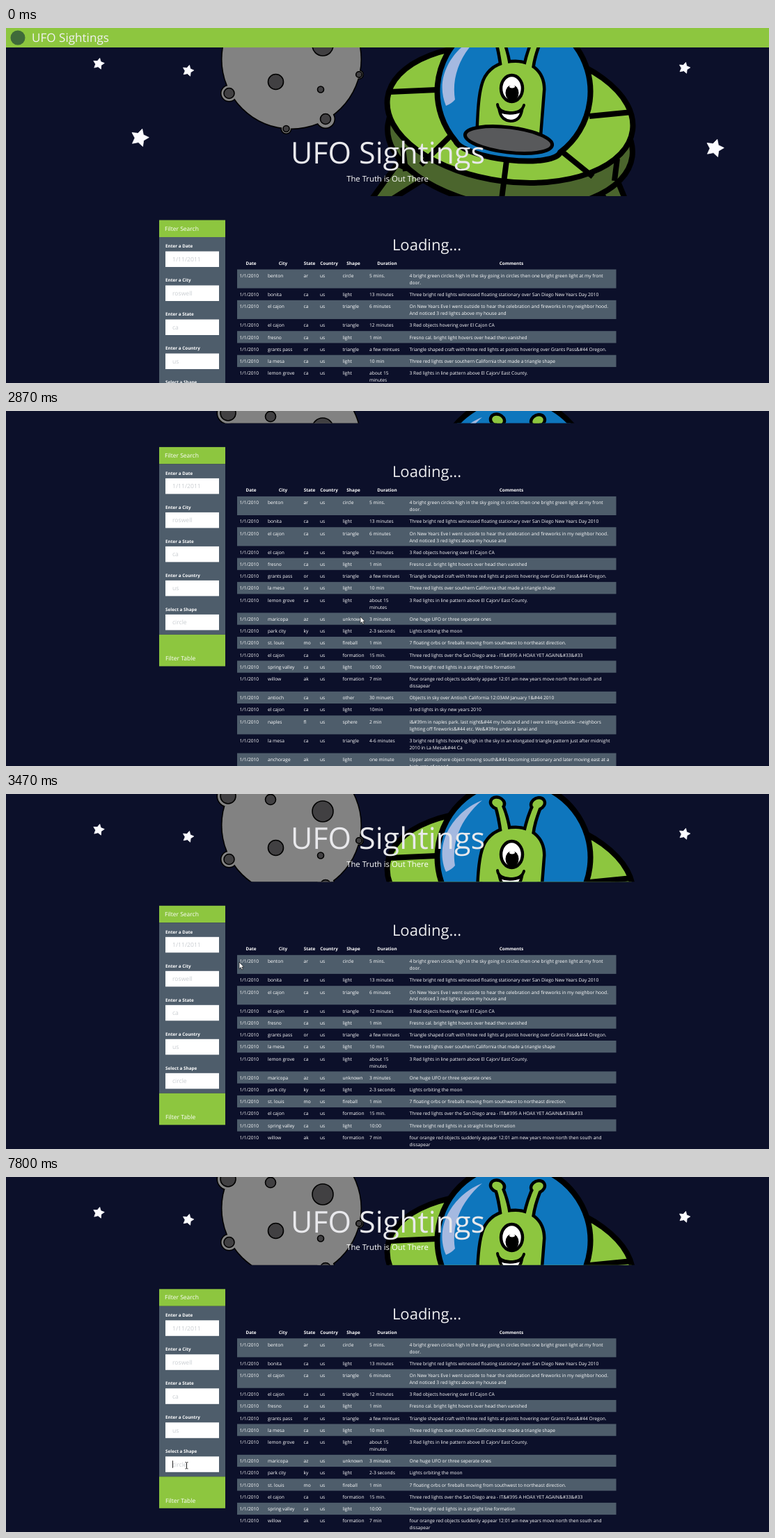
Write an HTML page that moves like this. It is 1096 by 511 pixels and loops after 8000 ms.

```html
<!DOCTYPE html>
<html lang="en">
<head>
<meta charset="utf-8">
<title>UFO Sightings</title>
<style>
  html, body { margin: 0; width: 100%; height: 100%; overflow: hidden; background: #0c102a; }
  svg { display: block; width: 1096px; height: 511px; }
  text { font-family: "Open Sans", "Noto Sans", sans-serif; text-rendering: geometricPrecision; white-space: pre; }
</style>
</head>
<body>
<svg id="stage" viewBox="0 0 1096 511" xmlns="http://www.w3.org/2000/svg"></svg>
<script>
const LOOP = 8000;
const NIGHT = '#0c102a', GREEN = '#8dc63f', OLIVE = '#4b652d', SLATE = '#4e5d6b', BLUE = '#0e76bd';
const stage = document.getElementById('stage');

// --- markup helpers ---
const escapeText = s => s.replace(/&/g, '&amp;').replace(/</g, '&lt;');
const text = (x, y, size, str, attrs = '') =>
  `<text x="${x}" y="${y}" font-size="${size}" fill="#fff" ${attrs}>${escapeText(str)}</text>`;
const rect = (x, y, w, h, fill, attrs = '') =>
  `<rect x="${x}" y="${y}" width="${w}" height="${h}" fill="${fill}" ${attrs}/>`;
const circle = (x, y, r) => `<circle cx="${x}" cy="${y}" r="${r}"/>`;
const path = (d, attrs = '') => `<path d="${d}" ${attrs}/>`;
const MIDDLE = 'text-anchor="middle"';

// Outlines a union of shapes: every stroke first, then every fill.
const outlined = (shapes, fill, width) =>
  `<g fill="#000" stroke="#000" stroke-width="${width}">${shapes}</g><g fill="${fill}">${shapes}</g>`;

// --- backdrop, which stays put while the page scrolls ---
function star(x, y, r, turn) {
  const points = Array.from({ length: 10 }, (_, i) => {
    const a = (turn - 90 + i * 36) * Math.PI / 180, d = i % 2 ? r * 0.52 : r;
    return `${(x + d * Math.cos(a)).toFixed(1)},${(y + d * Math.sin(a)).toFixed(1)}`;
  });
  return `<polygon points="${points.join(' ')}" fill="#fbfbff" stroke="#fbfbff" stroke-width=".8" stroke-linejoin="round"/>`;
}

function moon() {
  const bumps = [[319, 3, 15, 11], [320.5, 94, 11, 7.5], [402.5, 145, 6.5, 4.5], [459, 131, 12.5, 7.5], [507, 67, 5.5, 4.3]];
  const craters = [[387.5, 77.5, 11], [380, 8, 7.5], [455, 25, 15], [452, 88.5, 4.5]];
  const body = circle(410, 45, 99.5) + bumps.map(([x, y, r]) => circle(x, y, r)).join('');
  const pits = craters.concat(bumps.map(([x, y, , r]) => [x, y, r]));
  return outlined(body, '#828282', 3) +
    `<g fill="#414042" stroke="#000" stroke-width="1.6">${pits.map(p => circle(...p)).join('')}</g>`;
}

function saucer() {
  const disc = (y, rx, ry, fill) =>
    `<ellipse cx="724" cy="${y}" rx="${rx}" ry="${ry}" fill="${fill}" transform="rotate(7.5 724 ${y})"/>`;
  const legs = path('M562 196L524 248H552L606 214Z M838 216L862 248H890L872 204Z', `fill="${OLIVE}"`);
  const ribs = path('M551 92L618 89M596 197L649 145M720 183L712 246M795 175L843 214M838 127L899 121M570 172L574 206M878 188L874 220', 'fill="none"');
  const dome = path('M646 163A110 110 0 1 1 796 179A76 21 7 0 1 646 163Z', `fill="${BLUE}"`);
  return `<g stroke="#000" stroke-width="8" stroke-linejoin="round">` +
    legs + disc(162, 177, 96, OLIVE) + disc(124, 177.5, 97, GREEN) + ribs + dome + '</g>' +
    path('M684 9C648 23 613 66 632 112Q640 109 645 103C640 72 651 37 684 9Z', 'fill="#a5b9e0"');
}

function alien() {
  const knobs = '<ellipse cx="706" cy="13" rx="8" ry="6" transform="rotate(20 706 13)"/>' +
    '<ellipse cx="764" cy="14" rx="8" ry="6" transform="rotate(-25 764 14)"/>';
  const stalks = 'M704 14C709 28 711 42 713 56L722 56C720 40 716 26 710 13Z M760 14C753 28 749 42 746 56L755 58C757 42 762 28 767 16Z';
  const body = path('M678 165C680 135 679 90 690 71C699 56 714 50 732 50C752 50 771 63 771 88L765 165Z');
  return outlined(knobs + path(stalks) + body, GREEN, 9) +
    '<ellipse cx="722" cy="161" rx="63" ry="18" fill="#58595b" stroke="#000" stroke-width="5" transform="rotate(7 722 161)"/>' +
    '<ellipse cx="726.5" cy="87" rx="15.5" ry="19" fill="#fff" stroke="#000" stroke-width="4.5"/>' +
    '<ellipse cx="727" cy="93.5" rx="9.5" ry="11.5"/><ellipse cx="727" cy="84" rx="4" ry="2.5" fill="#fff"/>' +
    path('M709 120Q725 126 741 119Q738 134 725 134Q712 133 709 120Z', 'fill="#fff" stroke="#000" stroke-width="4"') +
    path('M706 110Q707 121 724 122Q741 122 744 111', 'fill="none" stroke="#000" stroke-width="4" stroke-linecap="round"');
}

const backdrop = () =>
  star(133, 51.5, 8.3, 12) + star(261.5, 61.5, 8.3, 14) + star(974.5, 57.5, 8.3, 14) +
  star(192, 158, 13.3, 16) + star(1018, 173, 13.3, 16) + moon() + saucer() + alien();

// --- page content ---
const FIELDS = [['Enter a Date', '1/11/2011'], ['Enter a City', 'roswell'], ['Enter a State', 'ca'], ['Enter a Country', 'us'], ['Select a Shape', 'circle']];
const FIELD_TOP = 321.5, FIELD_PITCH = 49, FIELD_HEIGHT = 22.5;
const HEADERS = [[352, 'Date'], [398, 'City'], [436, 'State'], [464, 'Country'], [499, 'Shape'], [547.5, 'Duration'], [726, 'Comments']];
const COLUMNS = [335.5, 376, 427.5, 451, 483.5, 522, 579.5];

// city; state; shape; duration; comments, where | breaks a line
const SIGHTINGS = `benton;ar;circle;5 mins.;4 bright green circles high in the sky going in circles then one bright green light at my front|door.
bonita;ca;light;13 minutes;Three bright red lights witnessed floating stationary over San Diego New Years Day 2010
el cajon;ca;triangle;6 minutes;On New Years Eve I went outside to hear the celebration and fireworks in my neighbor hood.|And noticed 3 red lights above my house and
el cajon;ca;triangle;12 minutes;3 Red objects hovering over El Cajon CA
fresno;ca;light;1 min;Fresno cal. bright light hovers over head then vanished
grants pass;or;triangle;a few mintues;Triangle shaped craft with three red lights at points hovering over Grants Pass&#44 Oregon.
la mesa;ca;light;10 min;Three red lights over southern California that made a triangle shape
lemon grove;ca;light;about 15|minutes;3 Red lights in line pattern above El Cajon/ East County.
maricopa;az;unknown;3 minutes;One huge UFO or three seperate ones
park city;ky;light;2-3 seconds;Lights orbiting the moon
st. louis;mo;fireball;1 min;7 floating orbs or fireballs moving from southwest to northeast direction.
el cajon;ca;formation;15 min.;Three red lights over the San Diego area - IT&#395 A HOAX YET AGAIN&#33&#33
spring valley;ca;light;10:00;Three bright red lights in a straight line formation
willow;ak;formation;7 min;four orange red objects suddenly appear 12:01 am new years move north then south and|dissapear
antioch;ca;other;30 minuets;Objects in sky over Antioch California 12:03AM January 1&#44 2010
el cajon;ca;light;10min;3 red lights in sky new years 2010
naples;fl;sphere;2 min;i&#39m in naples park. last night&#44 my husband and I were sitting outside --neighbors|lighting off fireworks&#44 etc. We&#39re under a lanai and
la mesa;ca;triangle;4-6 minutes;3 bright red lights hovering high in the sky in an elongated triangle pattern just after midnight|2010 in La Mesa&#44 Ca
anchorage;ak;light;one minute;Upper atmosphere object moving south&#44 becoming stationary and later moving east at a|high rate of speed`;

function table() {
  let y = 347.5;
  const rows = SIGHTINGS.split('\n').map((line, i) => {
    const [city, state, shape, duration, comments] = line.split(';');
    const height = line.includes('|') ? 27.1 : 17.25;
    const cells = ['1/1/2010', city, state, 'us', shape, duration, comments].map((cell, c) =>
      cell.split('|').map((part, n) => text(COLUMNS[c], y + 11.4 + n * 9.9, 6.65, part, 'font-weight="500"')).join(''));
    const row = (i % 2 ? '' : rect(332, y, 544.5, height, SLATE)) + cells.join('');
    y += height;
    return row;
  });
  return HEADERS.map(([x, label]) => text(x, 341, 6.4, label, `${MIDDLE} font-weight="700"`)).join('') + rows.join('');
}

function sidebar() {
  const fields = FIELDS.map(([label, hint], i) => {
    const y = FIELD_TOP + i * FIELD_PITCH;
    return text(229, y - 5.2, 6.35, label, 'font-weight="700"') +
      rect(229, y, 77, FIELD_HEIGHT, '#fff', `id="field${i}"`) +
      text(239, y + 14.3, 8.6, hint, `id="hint${i}" style="fill:#c9cdd1"`);
  });
  return rect(220, 276.5, 95, 24.5, GREEN) + rect(220, 301, 95, 245.5, SLATE) + rect(220, 546.5, 95, 45.5, GREEN) +
    text(228, 291.5, 8.5, 'Filter Search') + fields.join('') + text(229, 584, 8.55, 'Filter Table', 'font-weight="500"');
}

const page = () =>
  text(548.5, 195, 43, 'UFO Sightings', `${MIDDLE} style="fill:#e9e9ec"`) +
  text(548, 220.5, 11.3, 'The Truth is Out There', MIDDLE) +
  rect(0, 0, 1096, 28, GREEN) + `<g fill="#3f6a3a">${circle(17, 14, 10.5)}</g>` +
  text(37, 20, 17.1, 'UFO Sightings', 'style="fill:#f1f1f1"') +
  text(604.5, 320, 22, 'Loading...', `${MIDDLE} style="fill:#eeeef0"`) + sidebar() + table();

// --- suggestion list ---
const SUGGESTIONS = ['2/10/2010', 'ky', '1/7/2010'];
const MENU_TOP = 234, MENU_ROW = 20.7;
const menu = () =>
  rect(228.5, 229.5, 110.5, 71, '#fff', 'rx="2.5" stroke="#c4c8cc" stroke-width=".5"') +
  rect(228.7, 0, 110, MENU_ROW, '#e8e8e9', 'id="hover"') +
  SUGGESTIONS.map((s, i) => text(236, MENU_TOP + 13 + i * MENU_ROW, 6.85, s, 'style="fill:#111"')).join('');

stage.innerHTML =
  `<defs><clipPath id="hero"><rect id="window" width="1096" height="214"/></clipPath></defs>` +
  rect(0, 0, 1096, 511, NIGHT) + `<g clip-path="url(#hero)">${backdrop()}</g>` +
  `<g id="page">${page()}</g><g id="menu">${menu()}</g>` +
  rect(239, 0, 0.9, 10.5, '#111', 'id="caret"') +
  path('M0 0V9.6L2.2 7.6L3.7 11L5.3 10.3L3.8 7H6.6Z', 'id="arrow" fill="#fff" stroke="#000" stroke-width=".6"') +
  path('M-2 -4.6H-.6L0 -4L.6 -4.6H2M0 -4V4M-2 4.6H-.6L0 4L.6 4.6H2', 'id="beam" fill="none" stroke="#111" stroke-width=".9"');

// --- motion: [time, value...], each held until the next ---
const SCROLL = [[0, 0], [2000, 4.5], [2070, 82], [2130, 175], [2200, 218], [2270, 230.4],
  [2870, 224.6], [2930, 206], [3000, 182], [3070, 159], [3130, 138.8], [3200, 128],
  [3270, 122], [3330, 118.5], [3400, 116.7], [3470, 115.7], [3530, 115.2]];
const POINTER = [[0, -50, -50], [200, 655, 500], [270, 598, 418], [330, 545, 350], [400, 510, 310], [470, 498, 298],
  [800, 500, 297.5], [870, 503, 297], [930, 506, 296], [1000, 508, 296], [1070, 509, 296],
  [3270, 480, 285], [3330, 430, 268], [3400, 375, 252], [3470, 335, 242], [3530, 316, 239],
  [3670, 300, 231], [3730, 282, 224], [3800, 272.5, 221],
  [4800, 272, 228], [4870, 271, 243], [4930, 269, 262], [5000, 267, 285], [5070, 265, 312],
  [5130, 263, 340], [5200, 261, 370], [5270, 260, 395], [5330, 259.5, 410], [5400, 259.5, 415.3]];
const CARET = [[0, 0], [4130, 1], [4600, 0], [5130, 1], [6200, 0], [6730, 1], [7270, 0], [7800, 1]];
const MENU_OPEN = 4130, MENU_CLOSE = 5670;

const held = (keys, t) => keys.filter(k => k[0] <= t).pop();
const el = Object.fromEntries([...stage.querySelectorAll('[id]')].map(node => [node.id, node]));
const show = (node, on) => node.setAttribute('visibility', on ? 'visible' : 'hidden');

function render(t) {
  const [, scroll] = held(SCROLL, t);
  const [, x, y] = held(POINTER, t);
  el.window.setAttribute('y', 28 - scroll);
  el.page.setAttribute('transform', `translate(0 ${-scroll})`);

  const open = t >= MENU_OPEN && t < MENU_CLOSE;
  const overMenu = open && y > 229.5 && y < 301;
  const row = Math.floor((y - MENU_TOP) / MENU_ROW);
  const preview = overMenu ? SUGGESTIONS[row] : undefined;
  show(el.menu, open);
  el.hover.setAttribute('y', MENU_TOP + row * MENU_ROW);
  el.hover.setAttribute('opacity', preview ? 1 : 0);
  el.field0.setAttribute('fill', preview ? '#e8f0fe' : '#fff');
  el.hint0.textContent = preview || FIELDS[0][1];
  el.hint0.style.fill = preview ? '#495057' : '#c9cdd1';

  const focus = t < MENU_CLOSE ? 0 : 4;
  el.caret.setAttribute('y', FIELD_TOP - scroll + focus * FIELD_PITCH + 6);
  show(el.caret, held(CARET, t)[1]);

  const depth = y + scroll - FIELD_TOP;
  const typing = !overMenu && x > 229 && x < 306 && depth > 0 && depth < 5 * FIELD_PITCH && depth % FIELD_PITCH < FIELD_HEIGHT;
  for (const node of [el.arrow, el.beam]) node.setAttribute('transform', `translate(${x} ${y})`);
  show(el.arrow, !typing);
  show(el.beam, typing);
}

function tick() {
  render(performance.now() % LOOP);
  requestAnimationFrame(tick);
}
tick();
</script>
</body>
</html>
```
